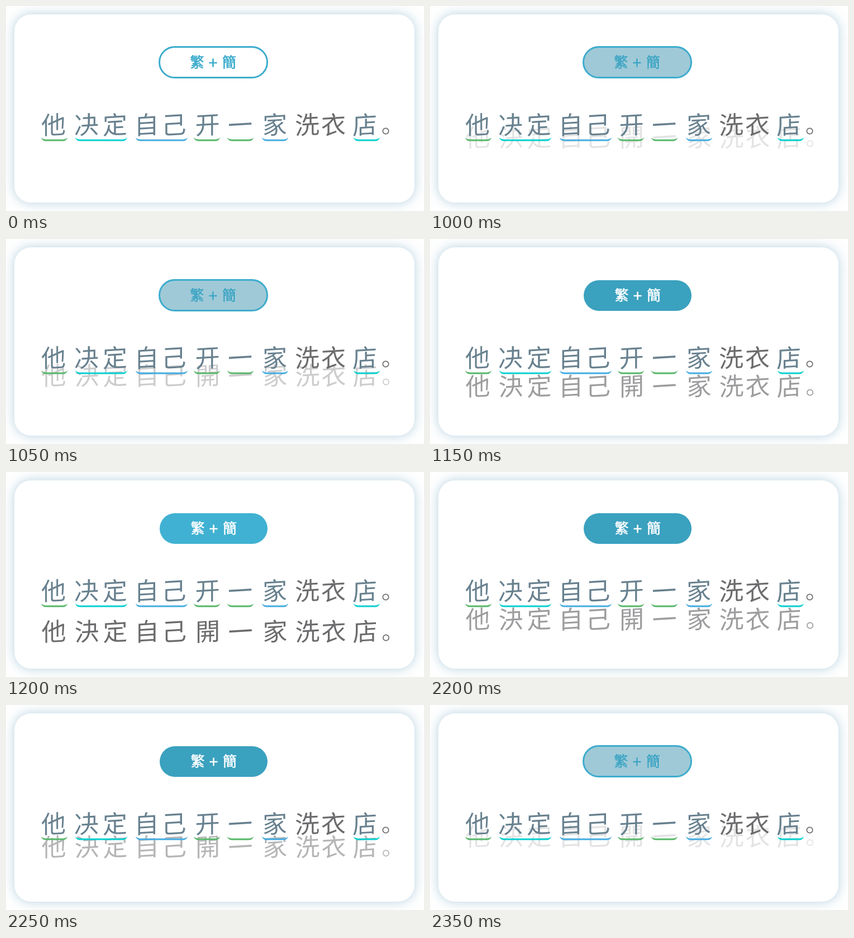
Recreate the animation shown at these times as an HTML page with a canvas. Size 748x368 px, loop 2.4 s.

```html
<!DOCTYPE html>
<html lang="zh-Hant">
<head>
<meta charset="utf-8">
<title>繁 + 簡</title>
<style>
  html, body { margin: 0; width: 100%; height: 100%; overflow: hidden; background: #fff; }
  canvas { display: block; }
</style>
</head>
<body>
<canvas id="stage" width="748" height="368"></canvas>
<script>
const ctx = document.getElementById('stage').getContext('2d');
const LOOP = 2400, STEP = 50;
const FONT = '"Noto Sans CJK TC", "Noto Sans CJK SC", "Noto Sans CJK JP", "Noto Sans CJK", sans-serif';
const SIMPLE = '他决定自己开一家洗衣店';
const FULL = '他決定自己開一家洗衣店';
const CENTERS = [85, 144, 195, 251.5, 300.5, 360.5, 419, 481, 539, 586, 642];
const BLUE = '#3daccd', SLATE = '#68818f', GRAY = '#6b6b6d';
const GREEN = '#56b768', CYAN = '#08cfd0', SKY = '#45ace1';
const MARKS = [
  [63, 110, GREEN], [124, 217, CYAN], [232, 325, SKY], [336, 383, GREEN],
  [396, 443, GREEN], [458, 505, SKY], [622, 669, CYAN]
];

function pill(x, y, w, h, r) {
  ctx.beginPath();
  ctx.roundRect(x, y, w, h, r);
}

function card() {
  ctx.fillStyle = '#fff';
  ctx.fillRect(0, 0, 748, 368);
  ctx.save();
  ctx.shadowColor = 'rgba(110, 165, 192, 0.5)';
  ctx.shadowBlur = 20;
  pill(15, 15, 716, 338, 30);
  ctx.fill();
  ctx.restore();
}

// Strokes rise a little to the right, as in brush writing.
function glyph(ch, x, y) {
  ctx.save();
  ctx.translate(x, y);
  ctx.transform(1, -0.06, 0, 1, 0, 0);
  ctx.fillText(ch, 0, 16.5);
  ctx.restore();
}

function sentence(text, y, color, dx = 0) {
  ctx.font = '300 44px ' + FONT;
  ctx.textAlign = 'center';
  [...text].forEach((ch, i) => {
    ctx.fillStyle = ch === '洗' || ch === '衣' ? GRAY : color;
    glyph(ch, CENTERS[i] + dx, y);
  });
  ctx.strokeStyle = GRAY;
  ctx.lineWidth = 1.7;
  ctx.beginPath();
  ctx.arc(679.5 + dx, y + 11.5, 5.2, 0, Math.PI * 2);
  ctx.stroke();
}

function mark([left, right, color]) {
  const r = 8, top = 234.5, a = left + r, b = right - r, half = Math.PI / 2;
  ctx.fillStyle = color;
  ctx.beginPath();
  ctx.ellipse(a, top, r, r, 0, Math.PI, half, true);
  ctx.ellipse(b, top, r, r, 0, half, 0, true);
  ctx.ellipse(b, top, r, r - 3, 0, 0, half);
  ctx.ellipse(a, top, r, r - 3, 0, half, Math.PI);
  ctx.fill();
}

function label(color, dx, weight) {
  ctx.textAlign = 'center';
  ctx.fillStyle = ctx.strokeStyle = color;
  ctx.lineWidth = weight;
  [['繁', 342, 109.5, 25], ['+', 370.5, 111.5, 28], ['簡', 399.5, 109.5, 25]].forEach(([ch, x, y, size]) => {
    ctx.font = `500 ${size}px ${FONT}`;
    ctx.fillText(ch, x + dx, y);
    if (weight) ctx.strokeText(ch, x + dx, y);
  });
}

function outlineButton(pressed) {
  pill(274.5, 73.5, 193, 55, 27.5);
  ctx.fillStyle = pressed ? '#9fc9d7' : '#fff';
  ctx.fill();
  ctx.strokeStyle = BLUE;
  ctx.lineWidth = 3;
  ctx.stroke();
  if (pressed) label('rgba(255, 255, 255, 0.45)', 1, 0);
  label(pressed ? '#3fa5c3' : BLUE, 0, 0.7);
}

function solidButton(pressed) {
  pill(275, 74, 193, 55, 27.5);
  ctx.fillStyle = pressed ? '#3aa1bf' : '#40b1d2';
  ctx.fill();
  label('#fff', 1, 0.5);
}

// 0 is closed, 1 to 4 are the steps of the slide, 5 is open.
function phase(t) {
  if (t < 1000) return 0;
  if (t < 1200) return 1 + Math.floor((t - 1000) / STEP);
  if (t < 2200) return 5;
  return 4 - Math.floor((t - 2200) / STEP);
}

function draw(t) {
  const p = phase(t);
  card();
  if (p > 0) {
    const k = (p - 1) / 3;
    ctx.save();
    ctx.globalAlpha = p === 5 ? 1 : 0.19 + 0.47 * k;
    sentence(FULL, p === 5 ? 286 : 235.5 + 28.5 * k, GRAY, 0.5);
    ctx.restore();
  }
  sentence(SIMPLE, 213, SLATE);
  MARKS.forEach(mark);
  if (p < 3) outlineButton(p > 0);
  else solidButton(p < 5);
}

const start = performance.now();
function tick() {
  draw((performance.now() - start) % LOOP);
  requestAnimationFrame(tick);
}
tick();
</script>
</body>
</html>
```
